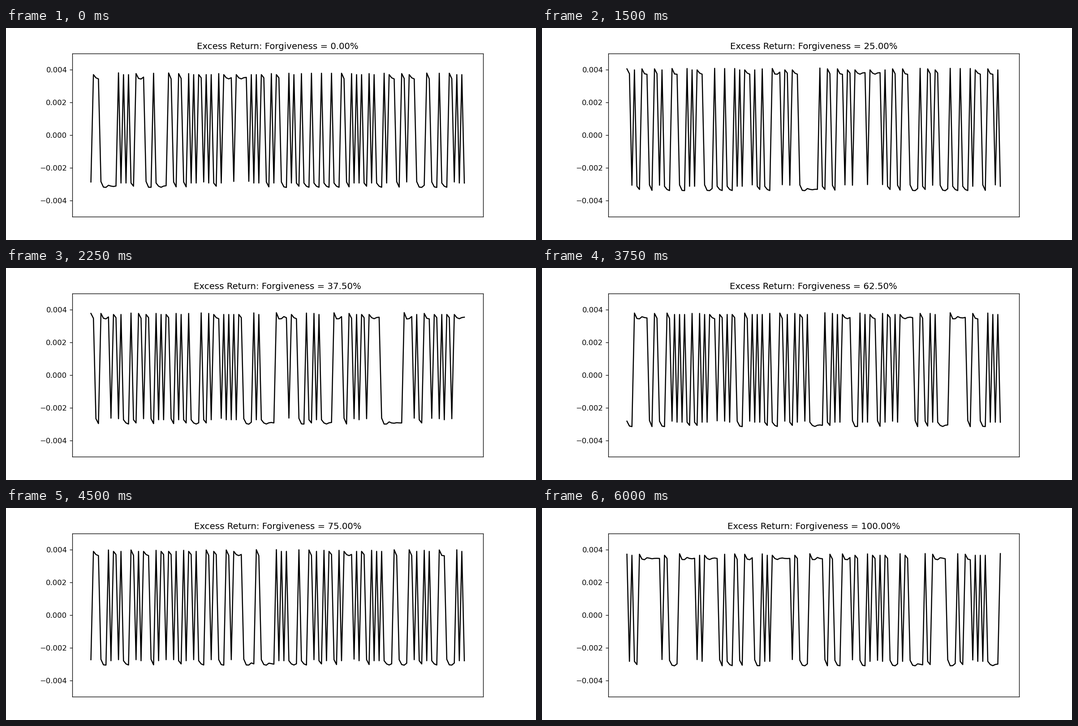
These frames come from a looping animation (1183x473 px, 6.75 s). A matplotlib script:

```python
import math

import numpy as np
import matplotlib.pyplot as plt
from matplotlib.animation import FuncAnimation

W, H, DPI = 1183, 473, 118.3
N = 150            # points per series
STEPS = 9          # forgiveness levels from 0 to 100 %
STEP_MS = 750
JUMP = 0.00032     # overshoot when the sign of the return changes
DECAY = 0.6        # how quickly the overshoot fades

# Settled returns of the up and down state at some forgiveness levels
KEYS = [0, 25, 37.5, 62.5, 75, 100]
UP = [0.00351, 0.00380, 0.00352, 0.00352, 0.00371, 0.00347]
DOWN = [-0.00313, -0.00333, -0.00293, -0.00308, -0.00299, -0.00303]


def overshoot(k, previous):
    """Damped ringing k points into a run, stronger after a longer run."""
    swing = 2.1 - 0.5 / previous
    strength = 1.0 - 0.4 / previous
    return JUMP * strength * DECAY ** k * math.cos(swing * k)


def excess_return(step):
    """Coin-flip states; each return settles towards the level of its state."""
    forgiveness = 100 * step / (STEPS - 1)
    up = np.interp(forgiveness, KEYS, UP)
    down = np.interp(forgiveness, KEYS, DOWN)
    states = np.random.default_rng(step).random(N) < 0.5

    values = []
    k, previous = 0, 2
    for i, state in enumerate(states):
        if i > 0:
            if state == states[i - 1]:
                k += 1
            else:
                k, previous = 0, k + 1
        values.append((up if state else down) + overshoot(k, previous))
    return np.array(values)


returns = [excess_return(step) for step in range(STEPS)]

# The small surplus keeps the pixel size from rounding down
fig, ax = plt.subplots(figsize=((W + 0.01) / DPI, (H + 0.01) / DPI), dpi=DPI)
line, = ax.plot(np.arange(N), returns[0], color="black")
ax.set_ylim(-0.005, 0.005)
ax.set_yticks(np.arange(-2, 3) * 0.002)
ax.set_xticks([])
title = ax.set_title("")


def update(step):
    line.set_ydata(returns[step])
    title.set_text(f"Excess Return: Forgiveness = {100 * step / (STEPS - 1):.2f}%")
    return line, title


anim = FuncAnimation(fig, update, frames=STEPS, interval=STEP_MS,
                     repeat=True, repeat_delay=0)
plt.show()
```
